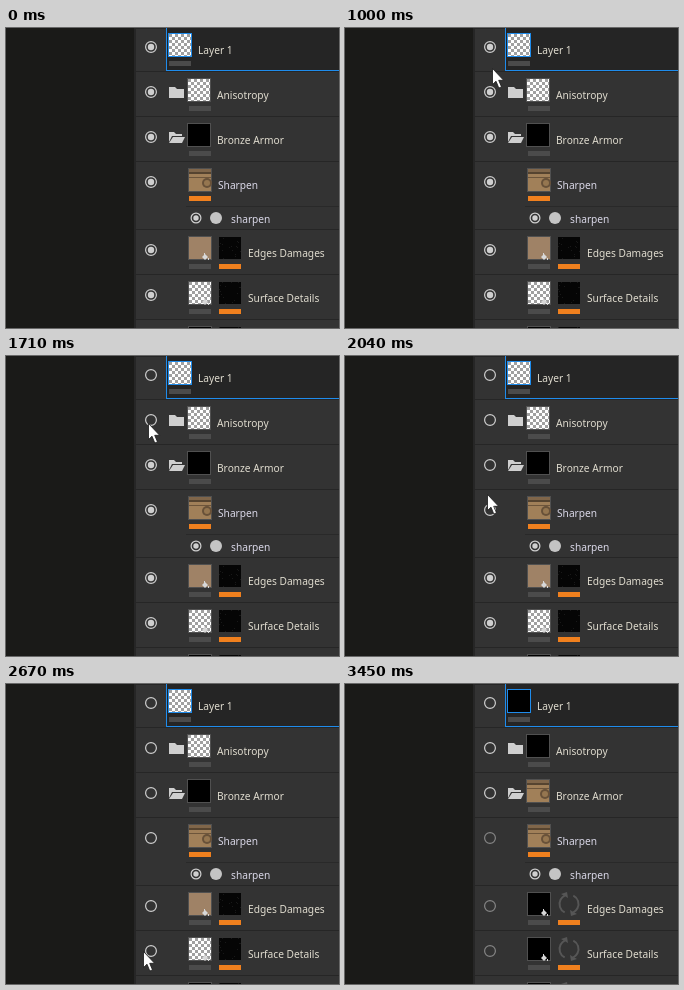
These frames come from a looping animation (333x300 px, 4.4 s). An HTML page with a canvas:

```html
<!DOCTYPE html>
<html lang="en">
<head>
<meta charset="utf-8">
<title>Layer stack visibility</title>
<style>
  html, body { margin: 0; width: 100%; height: 100%; overflow: hidden; background: #1a1a18; }
  canvas { display: block; width: 333px; height: 300px; }
</style>
</head>
<body>
<canvas id="stage" width="333" height="300"></canvas>
<script>
const ctx = document.getElementById('stage').getContext('2d');
const LOOP = 4400, SWIPE_AT = 1440, DIM_AT = 3000, REFRESH_AT = 3450, STEP = 90;
const GREY = '#4b4b4b', ORANGE = '#f0801e', BLUE = '#1f8cec', LIGHT = '#cfcfcf';
const CREAM = '#e0dccf', COOL = '#dad8e8', LINE = '#262626';

// y is the centre of the eye; everything else in a row hangs from it
const rows = [
  { y: 19, x: 162, text: 'Layer 1', fill: checker, later: black, selected: true },
  { y: 64, x: 181, text: 'Anisotropy', fill: checker, later: black, folder: 'closed' },
  { y: 109, x: 181, text: 'Bronze Armor', fill: black, later: armor, folder: 'open' },
  { y: 154, x: 182, text: 'Sharpen', fill: armor, later: armor, child: true, bar: ORANGE, tint: COOL },
  { y: 222, x: 182, text: 'Edges Damages', fill: tan, later: black, child: true, mask: true },
  { y: 267, x: 182, text: 'Surface Details', fill: checker, later: black, child: true, mask: true },
  { y: 312, x: 182, text: '', fill: black, later: black, child: true, mask: true }
];

// Pointer key points: time, x, y
const keys = [
  [460, 238, 232], [640, 189, 121], [910, 149, 50], [1170, 143, 19], [1350, 143, 19], [1440, 141, 24],
  [1950, 142, 110], [2040, 142, 138], [2490, 137, 248], [2670, 137, 267], [2820, 137, 275],
  [3090, 137, 275], [3180, 165, 284], [3360, 231, 302]
];

// The pointer moves in even steps between key points
function pointerAt(t) {
  const next = keys.findIndex(k => k[0] > t);
  if (next < 1) return null;
  const [t0, x0, y0] = keys[next - 1], [t1, x1, y1] = keys[next];
  const n = Math.round((t1 - t0) / STEP);
  const p = Math.floor((t - t0) / (t1 - t0) * n + 1e-6) / n;
  return { x: Math.round(x0 + (x1 - x0) * p), y: Math.round(y0 + (y1 - y0) * p) };
}

function box(x, y, w, h, color) {
  ctx.fillStyle = color;
  ctx.fillRect(x, y, w, h);
}

function poly(points, color) {
  ctx.beginPath();
  points.forEach(([x, y]) => ctx.lineTo(x, y));
  ctx.closePath();
  ctx.fillStyle = color;
  ctx.fill();
}

function disc(x, y, r, color) {
  ctx.beginPath();
  ctx.arc(x, y, r, 0, Math.PI * 2);
  ctx.fillStyle = color;
  ctx.fill();
}

function at(x, y, draw) {
  ctx.save();
  ctx.translate(x, y);
  draw();
  ctx.restore();
}

function label(text, x, y, color = CREAM) {
  ctx.font = '10.2px "Noto Sans", "Open Sans", sans-serif';
  ctx.fillStyle = color;
  ctx.fillText(text, x, y);
}

function eye(x, y, on, color = LIGHT, r = 5.4) {
  ctx.beginPath();
  ctx.arc(x, y, r, 0, Math.PI * 2);
  ctx.strokeStyle = color;
  ctx.lineWidth = 1.2;
  ctx.stroke();
  if (on) disc(x, y, r - 2.2, color);
}

// Thumbnail fills, each 22 px square
function checker() {
  box(0, 0, 22, 22, '#ffffff');
  for (let y = 0; y < 22; y += 3)
    for (let x = y % 2 * 3; x < 22; x += 6)
      box(x, y, Math.min(3, 22 - x), Math.min(3, 22 - y), '#a0a0a0');
}

function black() { box(0, 0, 22, 22, '#000000'); }

function tan() { box(0, 0, 22, 22, '#9f8266'); }

function armor() {
  box(0, 0, 22, 22, '#a18059');
  box(0, 0, 22, 3, '#80664a');
  box(0, 3, 22, 2, '#564430');
  box(0, 8, 22, 1, '#6d553b');
  disc(18, 14, 5, '#685139');
  disc(18, 14, 3, '#957650');
}

function thumb(x, y, fill, border) {
  box(x, y, 24, 24, border);
  at(x + 1, y + 1, fill);
}

function bucket(x, y) {
  at(x, y, () => {
    poly([[-3, 0], [0, -3], [3, 0], [0, 3]], '#d8d8d8');
    box(-1, -4, 1, 3, '#d8d8d8');
    box(3, 1, 1, 2, '#d8d8d8');
  });
}

function mask(x, y) {
  box(x, y, 22, 22, '#050505');
  let seed = 7 + y;
  const rand = n => Math.floor((seed = seed * 16807 % 2147483647) / 2147483647 * n);
  for (let i = 0; i < 16; i++) box(x + rand(22), y + rand(22), 1, 1, '#181818');
}

function reload(x, y) {
  at(x, y, () => {
    ctx.strokeStyle = '#565656';
    ctx.lineWidth = 2;
    for (let i = 0; i < 2; i++) {
      ctx.beginPath();
      ctx.arc(0, 0, 9.5, -1.1, 1.1);
      ctx.stroke();
      poly([[1, 6], [2, 12], [8, 10]], '#565656');
      ctx.rotate(Math.PI);
    }
  });
}

function folder(x, y, open) {
  at(x, y, () => {
    if (open) {
      poly([[0, 10], [0, 0], [5, 0], [7, 2], [13, 2], [13, 4], [3, 4]], LIGHT);
      poly([[4, 5], [16, 5], [13, 11], [0, 11]], LIGHT);
    } else {
      poly([[0, 0], [6, 0], [8, 2], [15, 2], [15, 11], [0, 11]], LIGHT);
    }
  });
}

function arrow({ x, y }) {
  at(x, y, () => {
    ctx.lineJoin = 'round';
    poly([[0.5, 0.5], [0.5, 16.5], [4, 13.2], [6.8, 20], [9.5, 18.9], [6.7, 12.3], [11.6, 12.3]], '#ffffff');
    ctx.strokeStyle = '#181818';
    ctx.lineWidth = 0.8;
    ctx.stroke();
  });
}

function panel(pointer) {
  box(0, 0, 333, 300, '#1a1a18');
  box(130, 0, 203, 300, '#333333');
  box(128, 0, 2, 300, LINE);
  const edges = [0, 43, 88, 133, 201, 246, 291, 300];
  edges.forEach((top, i) => {
    const end = edges[i + 1];
    if (pointer && pointer.x >= 160 && pointer.y >= top && pointer.y < end) box(160, top, 173, end - top, '#282828');
    box(130, top, 203, 1, LINE);
  });
  box(180, 178, 153, 1, '#292929');
  box(160, 0, 173, 43, BLUE);
  box(161, 0, 172, 42, '#252525');
}

function drawRow(row, t, pointer) {
  const { x, y } = row, fresh = t >= REFRESH_AT;
  const swiped = t >= SWIPE_AT && (!pointer || pointer.y > y - 20);
  eye(145, y, !swiped, row.child && t >= DIM_AT ? '#858585' : LIGHT);
  if (row.folder) folder(163, y - 5, row.folder === 'open');
  thumb(x, y - 14, fresh ? row.later : row.fill, row.selected ? BLUE : '#505050');
  box(Math.max(x + 1, row.selected ? 0 : 183), y + 14, 22, 5, row.bar || GREY);
  if (row.mask) {
    bucket(199, y + 7);
    if (fresh) reload(224, y - 2);
    else mask(213, y - 13);
    box(213, y + 14, 22, 5, ORANGE);
  }
  label(row.text, x + (row.mask ? 60 : 30), y + 7, row.tint);
}

function draw(t) {
  const pointer = pointerAt(t);
  panel(pointer);
  for (const row of rows) drawRow(row, t, pointer);

  eye(190, 190, true, LIGHT, 4.9);
  disc(210, 190, 6, '#c4c4c4');
  label('sharpen', 225, 195, COOL);

  if (pointer) arrow(pointer);
}

const start = performance.now();
function tick() {
  draw((performance.now() - start) % LOOP);
  requestAnimationFrame(tick);
}
tick();
</script>
</body>
</html>
```
